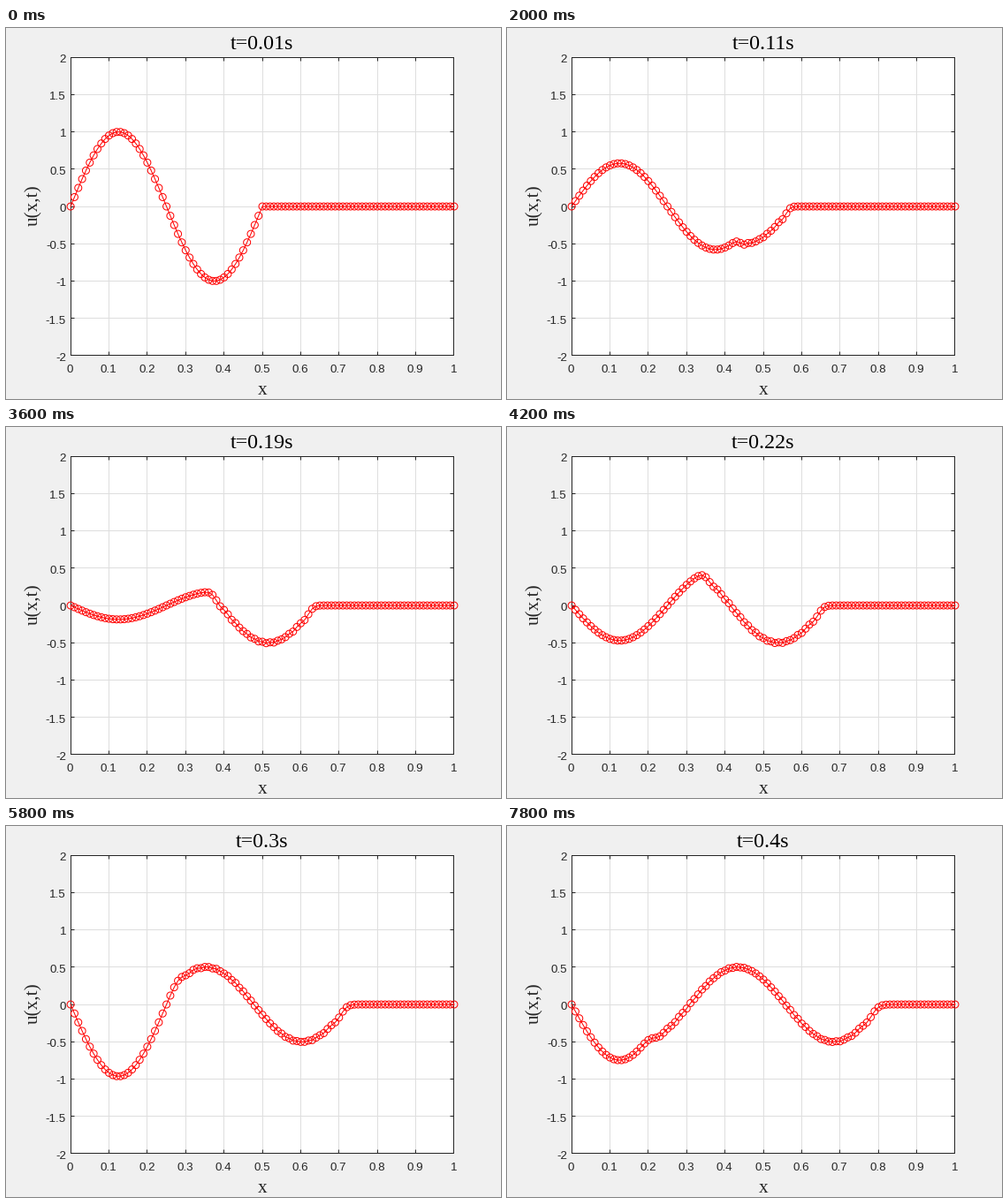
These frames come from a looping animation (560 px wide and 420 px high, 8 s). A matplotlib script:

```python
import numpy as np
import matplotlib.pyplot as plt
from matplotlib.animation import FuncAnimation
from matplotlib.collections import LineCollection

W, H, DPI = 560, 420, 100
PT = 72 / DPI  # points per pixel
LEFT, RIGHT, TOP, BOTTOM = 73.1, 506.95, 33.1, 370.95
INK = "#262626"
FRAMES = 40

# Explicit finite differences for u_tt = c^2 u_xx, starting at rest
dx = dt = 0.01
c = 0.8
r2 = (c * dt / dx) ** 2
x = np.linspace(0, 1, 101)
u0 = np.where(x < 0.5, np.sin(4 * np.pi * x), 0)
waves = [u0, u0.copy()]
while len(waves) < FRAMES:
    u, prev = waves[-1], waves[-2]
    new = np.zeros_like(u)
    new[1:-1] = 2 * u[1:-1] - prev[1:-1] + r2 * (u[2:] - 2 * u[1:-1] + u[:-2])
    waves.append(new)


def px(v):
    return LEFT + (RIGHT - LEFT) * v


def py(v):
    return BOTTOM - (BOTTOM - TOP) * (v + 2) / 4


fig = plt.figure(figsize=(W / DPI, H / DPI), dpi=DPI, facecolor="#f0f0f0")

# Half a pixel up and left, so that snapping puts each line on the pixel it falls in
ax = fig.add_axes([(LEFT - 0.5) / W, 1 - (BOTTOM - 0.5) / H,
                   (RIGHT - LEFT) / W, (BOTTOM - TOP) / H])
ax.set(xlim=(0, 1), ylim=(-2, 2), facecolor="white",
       xticks=np.arange(11) / 10, yticks=np.arange(-4, 5) / 2)
ax.set_axisbelow(True)
ax.grid(color="#dedede", linewidth=PT)
ax.tick_params(direction="in", top=True, right=True, length=4 * PT, width=PT,
               color=INK, labelbottom=False, labelleft=False)
for spine in ax.spines.values():
    spine.set(color=INK, linewidth=PT)

# Overlay in pixel coordinates, y pointing down
top = fig.add_axes([0, 0, 1, 1])
top.set(xlim=(0, W), ylim=(H, 0))
top.axis("off")


def label(tx, ty, s, size, family, color=INK, ha="center", **kw):
    return top.text(tx, ty, s, fontsize=size * PT, family=family, color=color,
                    ha=ha, va="baseline", **kw)


for k in range(11):
    label(px(k / 10) - 0.6, 390, f"{k / 10:g}", 13.33, "Liberation Sans")
for k in range(-4, 5):
    label(68, py(k / 2) + 5.9, f"{k / 2:g}", 13.33, "Liberation Sans", ha="right")
label(290, 415, "x", 21.33, "Liberation Serif")
label(36, 200.5, "u(x,t)", 21.33, "Liberation Serif",
      rotation=90, rotation_mode="anchor")
title = label(290, 24, "", 24, "Liberation Serif", color="black")

curve, = top.plot([], [], color="red", linewidth=PT, snap=False)
rings = LineCollection([], colors="red", linewidths=PT, zorder=3, snap=False)
top.add_collection(rings, autolim=False)
angle = np.linspace(0, 2 * np.pi, 41)
ring = 4 * np.column_stack([np.cos(angle), np.sin(angle)])


def draw(i):
    pts = np.column_stack([px(x), py(waves[i])])
    curve.set_data(pts[:, 0], pts[:, 1])
    rings.set_segments(pts[:, None] + ring)
    title.set_text(f"t={(i + 1) / 100:g}s")
    return curve, rings, title


anim = FuncAnimation(fig, draw, frames=FRAMES, init_func=lambda: draw(0),
                     interval=200, repeat=True, repeat_delay=0, blit=False)
plt.show()
```
